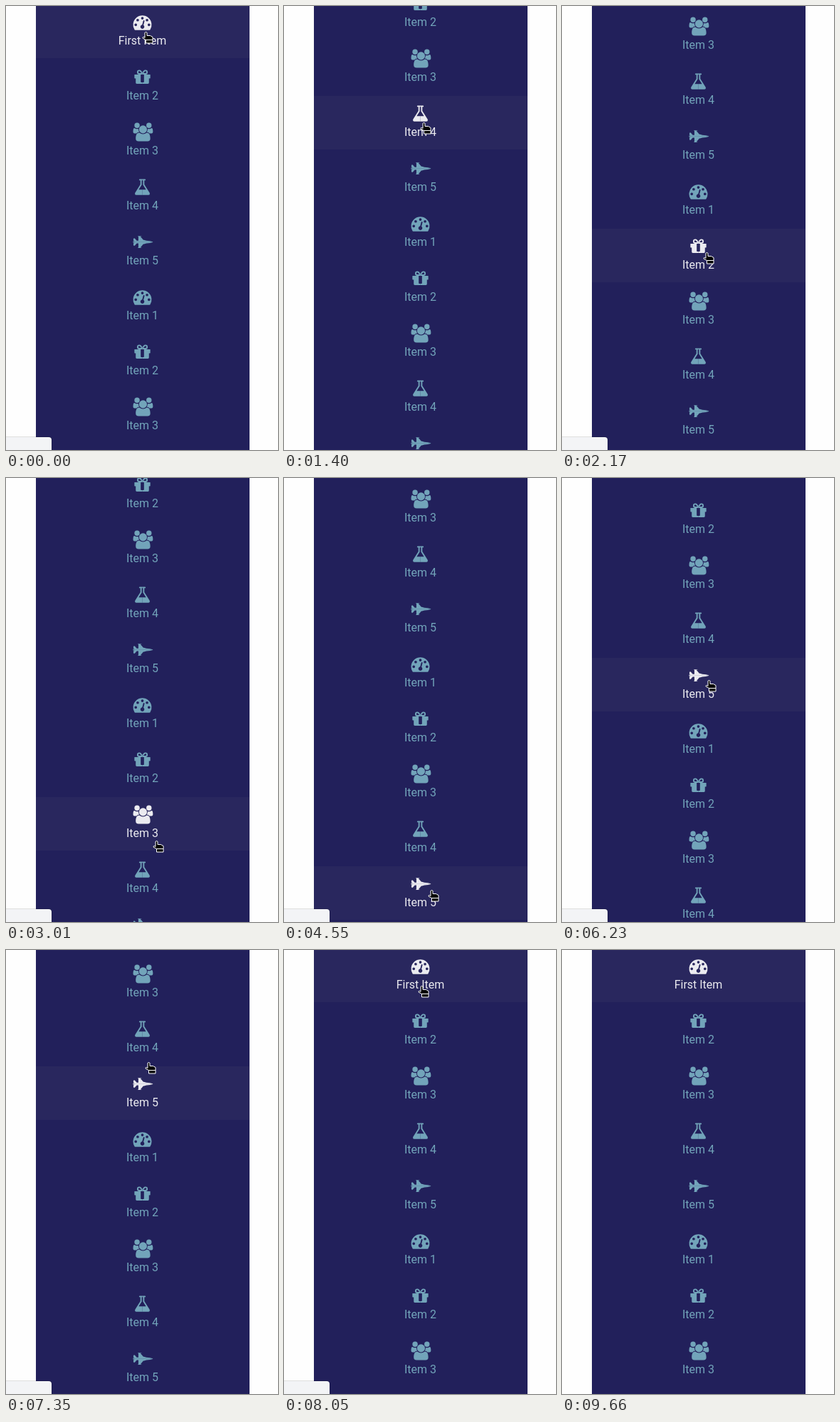
Recreate the animation shown at these times as an HTML page. Size 382 by 622 pixels, loop 9.8 s.

```html
<!DOCTYPE html>
<html lang="en">
<head>
<meta charset="utf-8">
<title>Sliding menu</title>
<style>
  html, body { margin: 0; width: 100%; height: 100%; overflow: hidden; background: #fefefe; }
  svg { display: block; width: 382px; height: 622px; }
  text { font: 16px Roboto, Arial, sans-serif; text-anchor: middle; }
  .item { fill: #72a4ba; }
  .item.on { fill: #ebebf0; }
</style>
</head>
<body>
<svg viewBox="0 0 382 622">
  <rect width="382" height="622" fill="#fefefe"/>
  <rect x="42" width="300" height="622" fill="#22205b"/>
  <g id="list"><rect id="row" x="42" width="300" height="75" fill="#29275e"/></g>
  <g id="status">
    <path d="M0 604H60Q64 604 64 608V622H0z" fill="#f3f4f6"/>
    <path d="M0 603.5H60Q64.5 603.5 64.5 608V622" fill="none" stroke="#000" stroke-opacity=".12"/>
  </g>
  <g id="hand" stroke="#fff" stroke-linejoin="round">
    <path d="M-1.5 8V1.5Q-1.5 0 0 0T1.5 1.5V5H6L9.5 7V11H0L-4.5 8.5Q-4.5 6.5-3 7z"/>
    <rect y="11" width="9.5" height="4.5"/>
  </g>
</svg>
<script>
const LOOP = 9800, STEP = 70, PITCH = 77, COUNT = 20;
const $ = id => document.getElementById(id);

// Icons live on a grid of 1792 units per em
const path = d => `<path fill-rule="evenodd" d="${d}"/>`;
const circle = (x, y, r) => `M${x - r} ${y}a${r} ${r} 0 1 0 ${2 * r} 0a${r} ${r} 0 1 0 ${-2 * r} 0z`;
const flipX = (s, width = 1792) => `${s}<g transform="matrix(-1 0 0 1 ${width} 0)">${s}</g>`;
const flipY = s => `${s}<g transform="matrix(1 0 0 -1 0 1792)">${s}</g>`;

const dials = Array.from({ length: 5 }, (_, i) => {
  const a = i * Math.PI / 4;
  return circle(896 - 640 * Math.cos(a), 1152 - 640 * Math.sin(a), 128);
});
const dome = 'M1651 1635A896 896 0 1 0 141 1635Q160 1664 195 1664H1597Q1632 1664 1651 1635z';
const needle = 'M1004 1185L1105 803A64 64 0 0 0 981 771L880 1153A192 192 0 1 0 1004 1185z';
const gauge = path(dome + needle + dials.join(''));

const bowHole = 'M600 512h195l-126-161q-26-31-69-31a96 96 0 0 0 0 192z';
const gift = flipX(path('M900 434L768 269Q707 192 600 192a224 224 0 0 0 0 448H160l-32 32v320l32 32h96v416q0 96 96 96H900V1408H800Q736 1408 736 1356V640H900z' + bowHole));

const friend = path('M593 896Q431 901 328 1024H194Q0 1024 0 865Q0 512 124 512Q254 597 384 597Q450 597 517 574Q495 750 593 896z' + circle(384, 256, 256));
const person = path('M602 960Q960 1240 1318 960C1600 960 1664 1250 1664 1533Q1664 1792 1397 1792H523Q256 1792 256 1533C256 1250 320 960 602 960z' + circle(960, 640, 384));
const users = flipX(friend, 1920) + person;

const flask = flipX(path('M900 128H640a64 64 0 0 0 0 128h64v399L201 1448Q115 1664 320 1664H900V1152H540L812 723 832 692V256H900z'));

const jet = flipY(path('M1920 890Q1920 928 1632 992L1280 1024 1056 1088H992L699 1440H768q64 0 64 16t-64 16H448v-32h64V1024H352L160 1248H64l-32-32v-192h32v-32h128v-8L0 960V890z'));

const icons = [gauge, gift, users, flask, jet];
const NS = 'http://www.w3.org/2000/svg';
const items = Array.from({ length: COUNT }, (_, i) => {
  const g = document.createElementNS(NS, 'g');
  g.setAttribute('transform', `translate(0 ${i * PITCH})`);
  g.innerHTML = `<g transform="translate(178.5 9.6) scale(${26 / 1792})">${icons[i % 5]}</g>`
    + `<text x="191.5" y="54">${i ? 'Item ' + (i % 5 + 1) : 'First Item'}</text>`;
  $('list').append(g);
  return g;
});

// Pointer stops: time, x, y, scroll, and how long it rests there
const stops = [
  { t: 0, x: 196, y: 36, s: 0, rest: 910 },
  { t: 1400, x: 196, y: 163, s: 103 },
  { t: 2170, x: 203, y: 345, s: 533, rest: 280 },
  { t: 3010, x: 211, y: 508, s: 860 },
  { t: 3500, x: 207, y: 579, s: 918, rest: 980 },
  { t: 5250, x: 209, y: 473, s: 810 },
  { t: 6230, x: 206, y: 283, s: 439 },
  { t: 6370, x: 205, y: 277, s: 385, rest: 350 },
  { t: 7350, x: 200, y: 157, s: 143 },
  { t: 7770, x: 196, y: 100, s: 0 },
  { t: 8050, x: 193, y: 50, s: 0, rest: 630 },
  { t: 9240, x: 189, y: -20, s: 0, rest: LOOP }
];
const keys = stops.flatMap(k => k.rest ? [k, { ...k, t: k.t + k.rest }] : [k]);

// Monotone cubic through one property of the keys
const slope = (i, p) => (keys[i + 1][p] - keys[i][p]) / (keys[i + 1].t - keys[i].t);
function tangent(i, p) {
  if (i === 0) return 0;
  const a = slope(i - 1, p), b = slope(i, p);
  return a * b <= 0 ? 0 : 2 * a * b / (a + b);
}
function value(t, p) {
  const i = keys.findIndex(k => k.t > t) - 1;
  if (i < 0) return keys[0][p];
  const a = keys[i], b = keys[i + 1], h = b.t - a.t;
  if (a[p] === b[p]) return a[p];
  const u = (t - a.t) / h, v = 1 - u;
  return a[p] * (1 + 2 * u) * v * v + b[p] * u * u * (3 - 2 * u)
    + h * u * v * (tangent(i, p) * v - tangent(i + 1, p) * u);
}

const ramp = (t, start, steps) => Math.max(0, Math.min(1, (t - start + STEP) / (steps * STEP)));

function draw(time) {
  const t = Math.floor(time % LOOP / STEP) * STEP;
  const [x, y, scroll] = ['x', 'y', 's'].map(p => Math.round(value(t, p)));
  // Hover trails the pointer by half a step
  const late = t - STEP / 2;
  const over = Math.max(0, Math.floor((value(late, 'y') + value(late, 's') + 2) / PITCH));

  $('list').setAttribute('transform', `translate(0 ${-scroll})`);
  $('row').setAttribute('y', over * PITCH - 2);
  items.forEach((g, i) => g.setAttribute('class', i === over ? 'item on' : 'item'));
  $('hand').setAttribute('transform', `translate(${x + 0.5} ${y + 0.5})`);
  $('status').setAttribute('opacity', 1 - ramp(t, 280, 3) + ramp(t, 2030, 3) - ramp(t, 9450, 4));
}

let begin;
function tick(now) {
  begin ??= now;
  draw(now - begin);
  requestAnimationFrame(tick);
}
draw(0);
requestAnimationFrame(tick);
</script>
</body>
</html>
```
